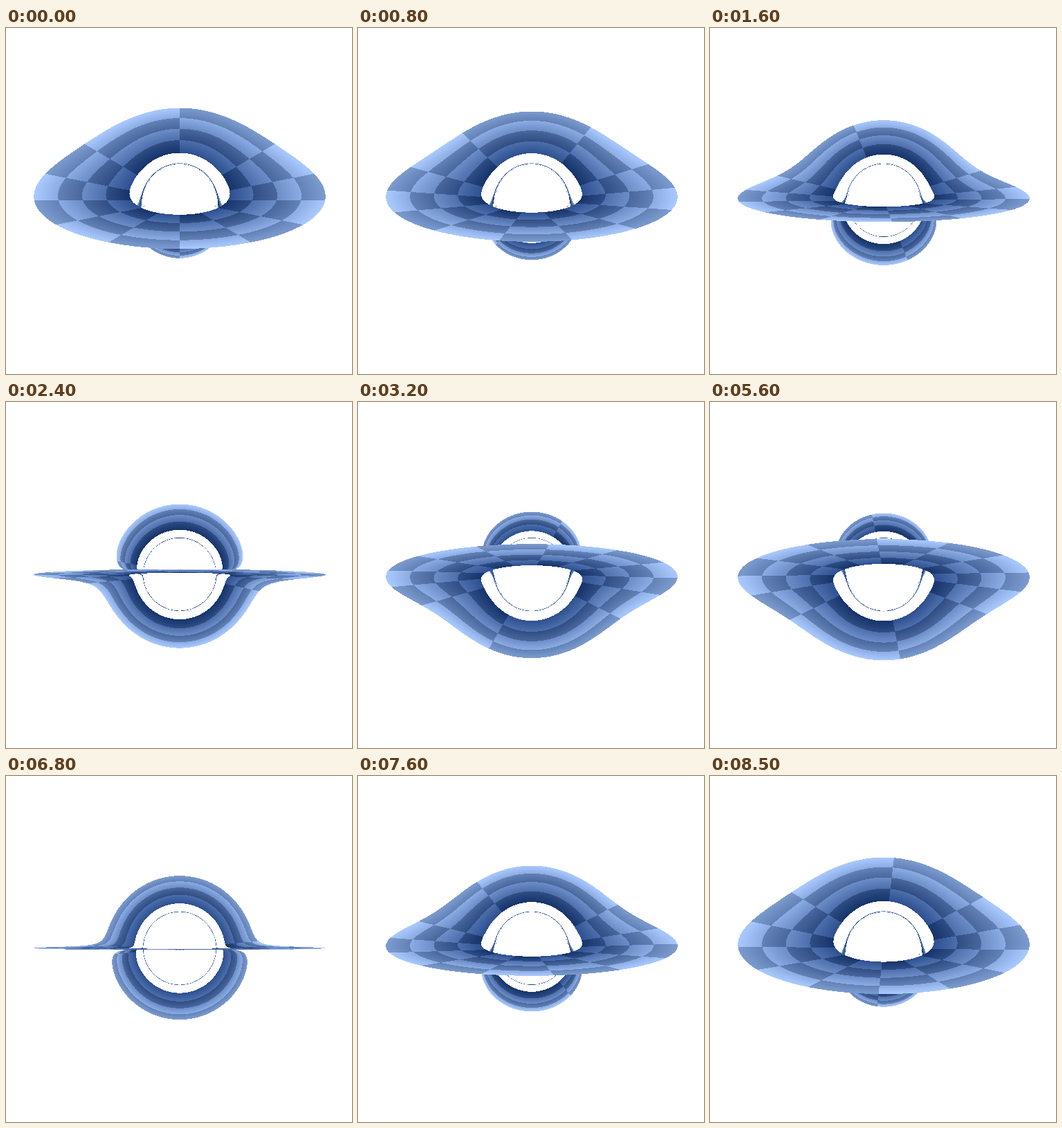
An HTML page with a canvas that plays this animation: 500 px wide and 500 px high, repeating every 8600 ms.

```html
<!DOCTYPE html>
<html lang="en">
<head>
<meta charset="utf-8">
<title>Lensed accretion disk</title>
<style>
html, body { margin: 0; width: 100%; height: 100%; overflow: hidden; background: #fff; }
canvas { display: block; width: 500px; height: 500px; }
</style>
</head>
<body>
<canvas id="stage" width="500" height="500"></canvas>
<script>
// Lengths are in units of the black hole's mass, angles in radians.
const SIZE = 500, CENTER_X = 251, CENTER_Y = 249, SCALE = 10;
const R_IN = 6, R_OUT = 20, BANDS = 4, SECTOR = Math.PI / 6;
const CAMERA_DISTANCE = 800, MAX_TILT = 20 * Math.PI / 180;
const STEPS = 86, STEP_MS = 100, TILT_PERIOD = 90;
const BRIGHT = [[46, 80, 144], [170, 202, 255]];
const DARK = [[22, 52, 108], [124, 155, 207]];

// Table of u = 1/r along each light ray, by image radius and swept angle.
const RHO_STEP = 0.05, RHO_MAX = 215, PHI_STEP = 0.02, SUBSTEPS = 4;
const ROWS = Math.round(RHO_MAX / RHO_STEP);
const COLS = Math.ceil((3 * Math.PI + 0.1) / PHI_STEP) + 2;
const CAPTURED = 9;
const rays = new Float32Array(ROWS * COLS);

function traceRay(row) {
  const h = PHI_STEP / SUBSTEPS;
  const accel = u => 3 * u * u - u;
  let u = 0, v = SCALE / ((row + 0.5) * RHO_STEP);
  for (let col = 1; col < COLS; col++) {
    for (let i = 0; i < SUBSTEPS; i++) {
      const a = accel(u);
      u += v * h + a * h * h / 2;
      v += (a + accel(u)) * h / 2;
    }
    if (u > 0.5) {
      rays.fill(CAPTURED, row * COLS + col, (row + 1) * COLS);
      return;
    }
    if (u <= 0) return;
    rays[row * COLS + col] = u;
  }
}
for (let row = 0; row < ROWS; row++) traceRay(row);

function inverseRadius(row, phi) {
  const col = Math.floor(phi / PHI_STEP), i = row * COLS + col;
  return rays[i] + (rays[i + 1] - rays[i]) * (phi / PHI_STEP - col);
}

const ctx = document.getElementById('stage').getContext('2d');
const picture = ctx.createImageData(SIZE, SIZE);

function paintDisk(offset, r, azimuth) {
  const t = (r - R_IN) / (R_OUT - R_IN);
  const cell = Math.floor(t * BANDS) + Math.floor(azimuth / SECTOR);
  const [inner, outer] = cell & 1 ? BRIGHT : DARK;
  for (let c = 0; c < 3; c++) {
    picture.data[offset + c] = inner[c] + (outer[c] - inner[c]) * t;
  }
}

function render(step) {
  const tilt = MAX_TILT * Math.cos(2 * Math.PI * step / TILT_PERIOD);
  const spin = Math.PI * step / STEPS;
  const sinTilt = Math.sin(tilt), cosTilt = Math.cos(tilt);
  picture.data.fill(255);
  for (let y = 100; y < 400; y++) {
    for (let x = 36; x < 466; x++) {
      const dx = x + 0.5 - CENTER_X, dy = CENTER_Y - y - 0.5;
      const rho = Math.hypot(dx, dy);
      if (rho >= RHO_MAX) continue;
      const row = Math.floor(rho / RHO_STEP);
      const right = dx / rho, up = dy / rho;

      // Angle from the camera axis at which this ray's plane meets the disk.
      let phi = Math.atan2(sinTilt, -up * cosTilt);
      if (phi < 0) phi += Math.PI;
      const parallax = rho / SCALE / CAMERA_DISTANCE;

      // The first of up to three disk crossings is the visible one.
      for (let n = 0; n < 3; n++) {
        const u = inverseRadius(row, phi + n * Math.PI + parallax);
        if (u <= 0 || u === CAPTURED) break;
        const r = 1 / u;
        if (r < R_IN || r >= R_OUT) continue;
        const side = n % 2 ? -1 : 1;
        const across = side * right * Math.sin(phi);
        const back = side * (up * sinTilt * Math.sin(phi) - cosTilt * Math.cos(phi));
        paintDisk((y * SIZE + x) * 4, r, Math.atan2(-across, back) - spin);
        break;
      }
    }
  }
  ctx.putImageData(picture, 0, 0);
}

let shown = -1;
function tick() {
  const step = Math.floor(performance.now() / STEP_MS) % STEPS;
  if (step !== shown) render(shown = step);
  requestAnimationFrame(tick);
}
tick();
</script>
</body>
</html>
```
